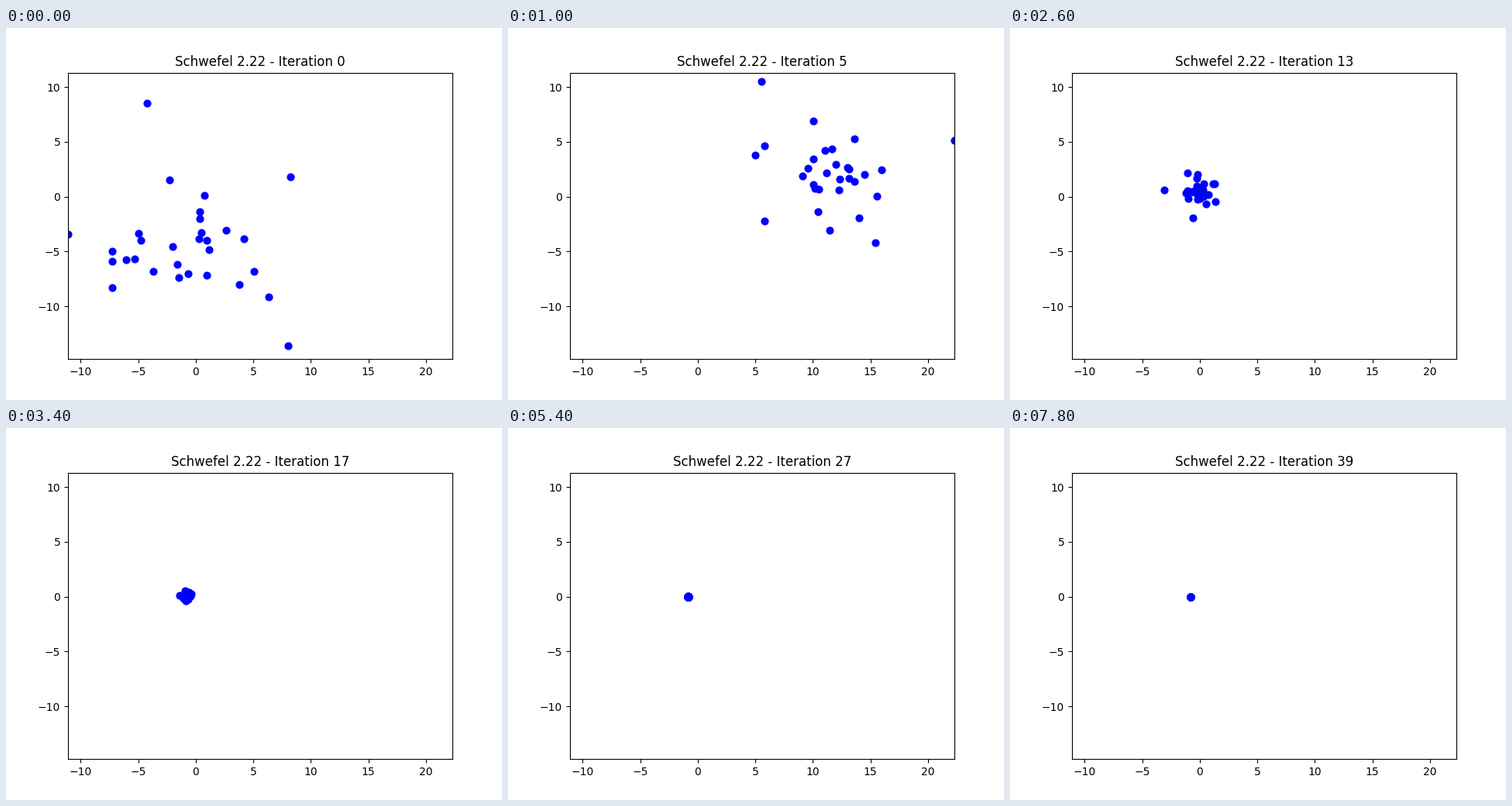
These frames come from a looping animation (640x480 px, 8000 ms). A matplotlib script:

```python
import numpy as np
import matplotlib.pyplot as plt
from matplotlib.animation import FuncAnimation

STEPS, STEP_MS = 40, 200
XLIM, YLIM = (-11.1, 22.29), (-14.81, 11.31)
LEADERS, CLOUD = 4, 26
TURN = 0.45  # how fast the cloud reshuffles, radians per step
COMPASS = np.array([(0, 1), (-1, 0), (1, 0), (0, -1)])


def pose(centre, spread, leaders=None):
    """Cloud centre, cloud deviation and the top, left, right, bottom dots."""
    centre, spread = np.array(centre), np.array(spread)
    if leaders is None:
        leaders = centre + 1.5 * spread * COMPASS
    return np.vstack([centre, spread, leaders])


POSES = {
    0: pose((0.5, -4.2), (4.3, 3.2),
            [(-4.2, 8.5), (-11.1, -3.4), (8.2, 1.8), (8.0, -13.6)]),
    5: pose((11.0, 1.5), (2.8, 2.5),
            [(5.5, 10.5), (5.0, 3.8), (22.29, 5.1), (15.4, -4.2)]),
    9: pose((1.4, 3.0), (1.7, 1.8),
            [(-1.1, 8.5), (-2.6, 3.8), (6.2, -0.7), (-0.5, -1.2)]),
    13: pose((0.1, 0.6), (0.7, 0.7),
             [(-1.1, 2.2), (-3.1, 0.6), (1.3, 1.2), (-0.6, -1.9)]),
    22: pose((-0.92, 0.04), (0.1, 0.08)),
    31: pose((-0.82, 0.0), (0.02, 0.0)),
    39: pose((-0.78, 0.0), (0.0, 0.0)),
}
KEYS = list(POSES)


def smooth(u):
    return u * u * (3 - 2 * u)


def settle(u):
    return 1 - (1 - u) ** 3


# Two bounded random clouds, mixed by a turning angle
rng = np.random.default_rng(7)
cloud_a, cloud_b = np.clip(rng.normal(size=(2, CLOUD, 2)), -1.8, 1.8)


def swarm(step):
    i = min(np.searchsorted(KEYS, step, side="right"), len(KEYS) - 1)
    start, end = KEYS[i - 1], KEYS[i]
    ease = smooth if end <= 9 else settle
    u = ease((step - start) / (end - start))
    now = (1 - u) * POSES[start] + u * POSES[end]
    centre, spread, leaders = now[0], now[1], now[2:]
    mix = np.cos(TURN * step) * cloud_a + np.sin(TURN * step) * cloud_b
    return np.vstack([leaders, centre + spread * mix])


fig, ax = plt.subplots(figsize=(6.4, 4.8), dpi=100)
ax.set_xlim(XLIM)
ax.set_ylim(YLIM)
dots = ax.scatter(*swarm(0).T, s=40, color="blue")
title = ax.set_title("")


def update(step):
    dots.set_offsets(swarm(step))
    title.set_text(f"Schwefel 2.22 - Iteration {step}")
    return dots, title


update(0)
anim = FuncAnimation(fig, update, frames=STEPS, interval=STEP_MS,
                     repeat=True, repeat_delay=0, blit=False)
plt.show()
```
